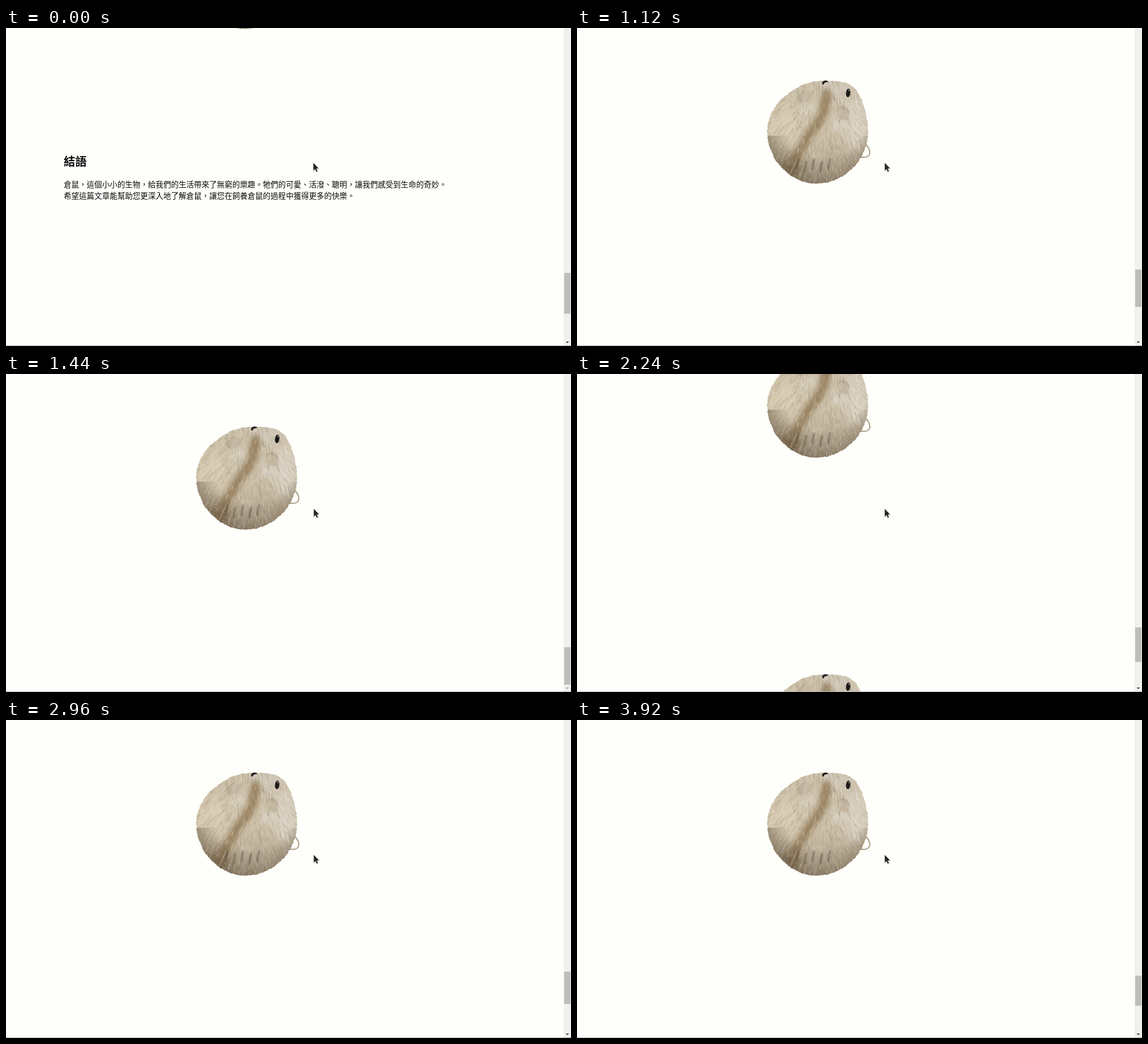
An HTML page with a canvas for the animation above (4000 ms loop, 998x561 px).

```html
<!DOCTYPE html>
<html lang="zh-Hant">
<head>
<meta charset="utf-8">
<title>結語</title>
<style>
html, body { margin: 0; width: 100%; height: 100%; overflow: hidden; background: #fefffa; }
canvas { display: block; }
</style>
</head>
<body>
<canvas id="stage" width="998" height="561"></canvas>
<script>
const W = 998, H = 561, LOOP = 4000, STEP = 80, TAU = Math.PI * 2;
const ctx = document.getElementById('stage').getContext('2d');
const FONT = '"Noto Sans CJK TC", "Noto Sans CJK", "Noto Sans CJK JP", sans-serif';

// Each scroll runs to the page end; a little later the page grows by one section.
const STARTS = [40, 1142, 2157, 3165];
const SCROLL_MS = 270, GROW_MS = 590;
const FIRST = 408, SECTION = 564;
const VIEW = 677, TRACK = VIEW - 26, TRACK_END = 548, PAGE = 6079;

const clamp = x => Math.max(0, Math.min(1, x));
const smooth = x => { x = clamp(x); return x * x * (3 - 2 * x); };
const progress = (start, t) => smooth((t - start) / SCROLL_MS);
const distance = i => i ? SECTION : FIRST;

let seed = 7;
const rand = () => (seed = (seed * 16807) % 2147483647) / 2147483647;
const spread = r => (rand() * 2 - 1) * r;

// The body is a circle with three bulges, angles in degrees.
const CX = 425, CY = 182;
function rim(deg) {
  const bulge = (at, width, height) => height * Math.exp(-(((deg - at) / width) ** 2));
  return 89 + bulge(309, 22, 11) - bulge(234, 30, 5) + bulge(95, 40, 3.5);
}
const polar = (deg, r) => [CX + Math.cos(deg / 360 * TAU) * r, CY + Math.sin(deg / 360 * TAU) * r];

function bodyPath() {
  const path = new Path2D();
  for (let a = 0; a < 360; a += 1.5) path.lineTo(...polar(a, rim(a) + spread(0.8)));
  path.closePath();
  return path;
}

function makeHamster() {
  const c = document.createElement('canvas');
  c.width = W;
  c.height = 300;
  const g = c.getContext('2d');
  g.lineCap = 'round';

  const oval = (color, x, y, rx, ry, turn = 0) => {
    g.fillStyle = color;
    g.beginPath();
    g.ellipse(x, y, rx, ry, turn, 0, TAU);
    g.fill();
  };
  const curve = (color, width, x, y, ...bezier) => {
    g.strokeStyle = color;
    g.lineWidth = width;
    g.beginPath();
    g.moveTo(x, y);
    g.bezierCurveTo(...bezier);
    g.stroke();
  };

  // foot
  curve('#b0a28a', 2.2, 511, 206, 520, 217, 521, 230, 502, 228);

  const body = bodyPath();
  g.filter = 'blur(.7px)';
  g.fillStyle = '#cdc1aa';
  g.fill(body);
  g.save();
  g.clip(body);

  // soft tones
  g.filter = 'blur(10px)';
  oval('#d8cbb2', 366, 172, 26, 42, 0.2);
  oval('#dad3c6', 494, 172, 18, 50);
  oval('#d0c8ba', 460, 108, 28, 16);
  oval('#bfb29c', 445, 226, 44, 24);
  oval('#8f7b60', 376, 250, 17, 22, -0.7);
  g.filter = 'blur(5px)';
  curve('rgba(135,110,72,.75)', 17, 441, 116, 438, 178, 402, 178, 380, 250);
  oval('#d6cdbd', 408, 144, 14, 9, -0.5);
  oval('#d6cebf', 461, 171, 13, 11);
  g.filter = 'none';
  const shade = g.createRadialGradient(437, 155, 72, 430, 165, 114);
  shade.addColorStop(0, 'rgba(96,80,60,0)');
  shade.addColorStop(1, 'rgba(96,80,60,.72)');
  g.fillStyle = shade;
  g.fillRect(0, 190, W, 110);

  // ears
  g.filter = 'blur(1px)';
  for (const [x, y, turn] of [[404, 121, -0.5], [471, 152, 1]]) {
    oval('#c3b6a1', x, y, 12, 9, turn);
    g.strokeStyle = '#a3957f';
    g.lineWidth = 1.4;
    g.beginPath();
    g.ellipse(x, y, 13, 10, turn, 2.6, 5);
    g.stroke();
  }

  // dark tufts on the back
  for (let i = 0; i < 5; i++) {
    const x = 389 + i * 14, y = 231 + i % 2 * 5;
    curve('rgba(72,62,50,.6)', 2.5, x + 2, y, x, y + 6, x - 1, y + 10, x - 1, y + 18);
  }

  // fur fans out from the head
  g.filter = 'none';
  const tones = ['#f3ebdb', '#eee8dd', '#8f7d62', '#7f705a', '#c2b194'];
  for (let i = 0; i < 1900; i++) {
    const [x, y] = polar(rand() * 360, Math.sqrt(rand()) * 96);
    const lean = (x - 437) / 14 + spread(2), len = 5 + rand() * 6;
    g.globalAlpha = 0.1 + rand() * 0.24;
    curve(tones[i % tones.length], 1, x, y, x, y + len / 3, x + lean / 2, y + len / 1.5, x + lean, y + len);
  }
  g.globalAlpha = 1;

  // eyes
  g.filter = 'blur(.5px)';
  oval('#1b1a18', 479, 114.5, 3.8, 7.6, 0.12);
  oval('#a5a199', 480.5, 110, 1, 1.4);
  oval('#1f1d1a', 438, 96, 5.5, 3.4, -0.5);
  oval('#cfc6b7', 440, 99.5, 5, 3.6, -0.5);
  g.restore();
  return c;
}

const hamster = makeHamster();

function drawHamster(y, alpha = 1) {
  ctx.globalAlpha = alpha;
  ctx.drawImage(hamster, 0, Math.round(y));
  ctx.globalAlpha = 1;
}

function drawText(scroll) {
  const line = (text, font, y) => {
    ctx.font = font + ' ' + FONT;
    ctx.fillText(text, 102, y - scroll);
  };
  ctx.fillStyle = '#0a0a0a';
  line('結語', 'bold 20.3px', 243);
  line('倉鼠，這個小小的生物，給我們的生活帶來了無窮的樂趣。牠們的可愛、活潑、聰明，讓我們感受到生命的奇妙。', '13.54px', 281);
  line('希望這篇文章能幫助您更深入地了解倉鼠，讓您在飼養倉鼠的過程中獲得更多的快樂。', '13.54px', 300.7);
}

function drawScrollbar(t) {
  const grown = STARTS.filter(s => t >= s + GROW_MS).length;
  const size = VIEW * TRACK / (PAGE + SECTION * grown);
  const p = grown < STARTS.length ? progress(STARTS[grown], t) : 0;
  const left = distance(grown) * (1 - p) * size / VIEW;
  ctx.fillStyle = '#f0f0ed';
  ctx.fillRect(985, 0, 13, H);
  ctx.fillStyle = '#bdbdba';
  ctx.fillRect(986, Math.round(TRACK_END - size - left), 11, Math.round(size));
  ctx.fillStyle = p === 1 ? '#a0a09e' : '#484846';
  ctx.beginPath();
  ctx.moveTo(988.5, 553);
  ctx.lineTo(994.5, 553);
  ctx.lineTo(991.5, 556);
  ctx.fill();
}

function drawCursor(x, y) {
  const arrow = new Path2D('M0 0V13.5L3.1 10.8L5.2 15.4L7.3 14.4L5.2 10L9 9.4Z');
  ctx.save();
  ctx.translate(x, y);
  ctx.shadowColor = 'rgba(0,0,0,.35)';
  ctx.shadowBlur = 2;
  ctx.shadowOffsetY = 1;
  ctx.strokeStyle = '#fff';
  ctx.stroke(arrow);
  ctx.shadowColor = 'transparent';
  ctx.fillStyle = '#242424';
  ctx.fill(arrow);
  ctx.restore();
}

function draw(t) {
  const scroll = STARTS.reduce((sum, s, i) => sum + distance(i) * progress(s, t), 0);
  ctx.fillStyle = '#fefffa';
  ctx.fillRect(0, 0, W, H);
  drawText(scroll);
  drawHamster(-273 - scroll);
  STARTS.forEach((s, i) => {
    const fade = i ? 1 : clamp((t - 60) / 600);
    drawHamster(FIRST + SECTION * i - scroll, fade);
  });
  drawScrollbar(t);
  ctx.fillStyle = '#b4b5b3';
  ctx.fillRect(0, 560, W, 1);
  drawCursor(t < 1120 ? 543 : 543.7, 238);
}

function tick() {
  const t = performance.now() % LOOP;
  draw(Math.floor(t / STEP) * STEP);
  requestAnimationFrame(tick);
}
tick();
</script>
</body>
</html>
```
